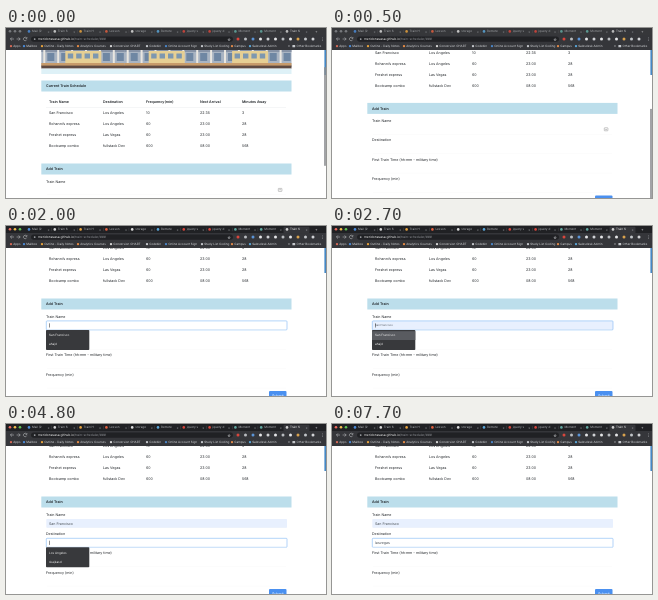
An HTML page that plays this animation: 320x170 px, repeating every 8000 ms.

```html
<!DOCTYPE html>
<html lang="en">
<head>
<meta charset="utf-8">
<title>Train schedule</title>
<style>
  html, body { margin: 0; width: 100%; height: 100%; overflow: hidden; background: #fff; }
  svg { display: block; width: 320px; height: 170px; }
  text { font-family: Inter, "Open Sans", sans-serif; text-rendering: geometricPrecision; white-space: pre; }
</style>
</head>
<body>
<svg id="stage" viewBox="0 0 320 170"></svg>
<script>
const NS = 'http://www.w3.org/2000/svg';
const LOOP = 8000, SCROLL_END = 63;
const stage = document.getElementById('stage');

function add(parent, tag, attrs = {}) {
  const el = document.createElementNS(NS, tag);
  for (const k in attrs) el.setAttribute(k, attrs[k]);
  return parent.appendChild(el);
}
const group = parent => add(parent, 'g');
const rect = (parent, x, y, width, height, fill, extra) =>
  add(parent, 'rect', { x, y, width, height, fill, ...extra });
const dot = (parent, cx, cy, r, fill) => add(parent, 'circle', { cx, cy, r, fill });

// y is the middle of the line
function label(parent, x, y, str, { size = 3.6, fill = '#212529', weight = 400, anchor = 'start' } = {}) {
  const el = add(parent, 'text', {
    x, y: y + size * 0.36, fill, 'font-size': size, 'font-weight': weight, 'text-anchor': anchor
  });
  el.textContent = str;
  return el;
}
const show = (el, on) => el.setAttribute('visibility', on ? 'visible' : 'hidden');

// ---- page ----
rect(stage, 0, 0, 320, 170, '#fff');
const page = group(stage);

function banner() {
  rect(page, 35.3, 10, 250.2, 29, '#a9b4c2');
  for (let i = 0; i < 3; i++) {
    const x = 35.3 + i * 83.4;
    rect(page, x, 20, 83.4, 4, '#8793a6');
    for (let k = 0; k < 6; k++) {
      const px = x + 2 + k * 13.9;
      rect(page, px, 22, 2, 15, '#e9e6e0');
      rect(page, px + 4, 25, 7, 8, '#6f87a3');
    }
    rect(page, x + 24, 23, 36, 13, '#e6cf94');
    for (let k = 0; k < 4; k++) rect(page, x + 26.5 + k * 8.4, 25.5, 5.4, 5, '#7d97b0');
    rect(page, x, 35, 83.4, 3, '#c79b6b');
  }
  rect(page, 35.3, 37.6, 250.2, 3, '#5e4a42');
  rect(page, 35.3, 40.6, 250.2, 5.4, '#def1f7');
}

function heading(y, str) {
  rect(page, 35.3, y - 5.5, 250.2, 11, '#bcdeeb');
  label(page, 40, y, str, { weight: 600 });
}

banner();
heading(58, 'Current Train Schedule');

const columns = [43, 97, 140, 194, 236];
[
  ['Train Name', 'Destination', 'Frequency(min)', 'Next Arrival', 'Minutes Away'],
  ['San Francisco', 'Los Angeles', '10', '22:35', '3'],
  ['Rohanni’s express', 'Los Angeles', '60', '23:00', '28'],
  ['Freshet express', 'Las Vegas', '60', '23:00', '28'],
  ['Bootcamp combo', 'fullstack Dev', '600', '08:00', '568']
].forEach((row, r) => row.forEach((cell, c) =>
  label(page, columns[c], 74 + r * 11, cell, { weight: r ? 400 : 600 })));
rect(page, 40, 79.3, 240, 0.4, '#e6e8ea');

heading(141, 'Add Train');
const fields = ['Train Name', 'Destination', 'First Train Time (hh:mm - military time)', 'Frequency (min)']
  .map((name, i) => {
    const y = 153.4 + i * 19.4;
    label(page, 40, y, name);
    const box = rect(page, 40.3, y + 4.5, 240.7, 9, '#fff', { rx: 0.8, 'stroke-width': 0.6 });
    rect(page, 41, y + 13.3, 239, 0.3, '#f4f4f4');
    return {
      box,
      text: label(page, 43, y + 9, '', { fill: '#495057' }),
      hint: label(page, 43, y + 9, '', { size: 2.7, fill: '#555b66' }),
      caret: rect(page, 43, y + 6.9, 0.5, 4.2, '#222', { visibility: 'hidden' })
    };
  });
const [train, dest] = fields;

const icon = group(page);
rect(icon, 272.3, 160.4, 3.6, 3, '#fff', { stroke: '#8c8c8c', 'stroke-width': 0.5, rx: 0.4 });
rect(icon, 273.2, 161.6, 1.8, 0.5, '#8c8c8c');

rect(page, 263, 228, 17.5, 11, '#4a90f0', { rx: 1 });
label(page, 271.8, 232.6, 'Submit', { fill: '#fff', anchor: 'middle' });

function dropdown(y, items) {
  const g = group(page);
  rect(g, 40, y, 43.3, 20, '#38393c', { rx: 0.8 });
  const hover = rect(g, 40, y + 1.2, 43.3, 8.8, '#595b60');
  items.forEach((s, i) => label(g, 43, y + 5.4 + i * 8.8, s, { size: 3.05, fill: '#f0f0f0' }));
  return { g, hover };
}
const trainMenu = dropdown(167, ['San Francisco', 'ahajd']);
const destMenu = dropdown(186.3, ['Los Angeles', 'skajkasd']);

// ---- browser frame ----
rect(stage, 318.4, 22, 1.6, 25, '#4488c6');
const thumb = rect(stage, 318.2, 39, 1.6, 99, '#8b8d90', { rx: 0.8 });
const strip = rect(stage, 0, 0, 320, 8, '#202124');
rect(stage, 0, 7, 320, 15, '#35363a');
const lights = ['#ed6a5e', '#f4bf4f', '#61c554'].map((c, i) => ({ c, el: dot(stage, 4 + i * 5, 3.3, 1.3, c) }));
const tabNames = ['Mail (2', 'Train S', 'Train H', 'Lesson', 'storage', 'Remote', 'jquery s', 'jquery d', 'Moment', 'Moment', 'Train S'];
const tabDots = ['#4b8bd8', '#d8d8d8', '#e8a33d', '#e2603f', '#dddddd', '#5aa6d8', '#d8463c', '#d8463c', '#62a8a0', '#62a8a0', '#cfcfcf'];
rect(stage, 277.5, 0.8, 26, 7, '#35363a', { rx: 1 });
const tabs = group(stage);
tabNames.forEach((name, i) => {
  const x = 23 + i * 25.8;
  dot(tabs, x, 3.4, 1.3, tabDots[i]);
  label(tabs, x + 3, 3.4, name, { size: 3, fill: i === 10 ? '#f1f1f1' : '#b4b7bb' });
  label(tabs, x + 18.5, 3.4, '×', { size: 3.2, fill: '#aaadb2' });
  if (i < 9) rect(tabs, x + 22.4, 1.8, 0.3, 3.4, '#5a5c60');
});
label(tabs, 309, 3.4, '+', { size: 4, fill: '#c8cacd' });

add(stage, 'path', {
  d: 'M8 11H4.4M6 9.4L4.4 11L6 12.6M10.6 11H14.2M12.6 9.4L14.2 11L12.6 12.6M20.5 10A1.7 1.7 0 1 0 20.7 11.6M20.9 9V10.4H19.5',
  fill: 'none', stroke: '#c8cacd', 'stroke-width': 0.5
});
rect(stage, 25, 8.4, 202, 5.4, '#202124', { rx: 2.7 });
dot(stage, 28.7, 11.1, 0.9, '#a0a3a8');
const url = label(stage, 32, 11.1, 'meridonavasa.github.io', { size: 3.25, fill: '#f1f1f1' });
add(url, 'tspan', { fill: '#92959a' }).textContent = '/train-scheduler/###';
label(stage, 221, 11.1, '☆', { size: 4, fill: '#c8cacd' });
['#d8463c', '#b9bcc0', '#5b94d6', '#e4e5e7', '#d0d2d5', '#e4e5e7', '#b9bcc0', '#e4e5e7', '#d9a24d', '#c1c4c8', '#d0d2d5']
  .forEach((c, i) => dot(stage, 232 + i * 7.5, 11.1, 1.5, c));
[0, 1, 2].forEach(i => dot(stage, 316.5, 9.8 + i * 1.3, 0.35, '#c8cacd'));

[
  [5, 'Apps', '#d56a58'], [18, 'Mailbox', '#4b8bd8'], [36, 'Outline - Daily Notes', '#e8a33d'],
  [72, 'Analytics Courses', '#e58b45'], [105, 'Conversion CHART', '#d8d8d8'],
  [141, 'Codebin', '#c5c8cc'], [160, 'Online Account Sign', '#4b86c8'],
  [196, 'Study List Coding', '#c5c8cc'], [226, 'Campus', '#e08a4a'],
  [244, 'Salesdesk Admin', '#5aa6d8']
].forEach(([x, name, c]) => {
  dot(stage, x, 18.1, 1.2, c);
  label(stage, x + 2.2, 18.1, name, { size: 3, fill: '#d6d8db' });
});
label(stage, 282, 18, '»', { size: 3.4, fill: '#d6d8db' });
rect(stage, 286.4, 17, 2.8, 2.2, '#c5c8cc', { rx: 0.3 });
label(stage, 290.6, 18.1, 'Other Bookmarks', { size: 3, fill: '#d6d8db' });

// ---- timeline ----
const within = (t, a, b) => t >= a && t < b;
const stepAt = (t, steps) => steps.reduce((v, [at, next]) => t >= at ? next : v, '');
const lit = (t, spans) => spans.some(([a, b]) => within(t, a, b));
const typing = [[5800, 'l'], [5900, 'la'], [6800, 'las'], [6900, 'lasve'], [7000, 'lasvega'], [7200, 'lasvegas']];
const stripTone = [[0, '#36373a'], [1200, '#5e6063'], [1300, '#424347'], [1400, '#202124']];
const caretOn = {
  train: [[1900, 2400], [2700, 3400]],
  dest: [[3400, 4000], [4300, 5300], [5800, 6500], [6800, 7700]]
};

function scrollAt(t) {
  const n = Math.floor(t / 100);
  return n >= 9 ? SCROLL_END : SCROLL_END * (1 - 0.52 ** n);
}

function paintField(f, focus, filled, value, hint, caret) {
  f.box.setAttribute('fill', filled ? '#e8f0fe' : '#fff');
  f.box.setAttribute('stroke', focus ? '#80b8f5' : 'none');
  if (f.text.textContent !== value) f.text.textContent = value;
  f.hint.textContent = hint;
  show(f.caret, caret);
  f.caret.setAttribute('x', 43 + (value ? f.text.getComputedTextLength() + 0.2 : 0));
}

function render(t) {
  const scroll = scrollAt(t);
  page.setAttribute('transform', `translate(0 ${-scroll})`);
  thumb.setAttribute('y', 39 + scroll * 0.69);
  show(thumb, t < 900);

  // the window gains focus
  const active = t >= 1300;
  strip.setAttribute('fill', stepAt(t, stripTone));
  tabs.setAttribute('opacity', active ? 1 : 0.85);
  lights.forEach(l => l.el.setAttribute('fill', active ? l.c : '#77797d'));

  const pickTrain = within(t, 2700, 2800), pickDest = within(t, 4300, 4800);
  paintField(train, within(t, 1900, 3400), t >= 2700, t >= 2800 ? 'San Francisco' : '',
    pickTrain ? 'San Francisco' : '', lit(t, caretOn.train));
  paintField(dest, t >= 3400, pickDest, stepAt(t, typing),
    pickDest ? 'Los Angeles' : '', lit(t, caretOn.dest));

  show(icon, t < 1900);
  show(trainMenu.g, within(t, 2000, 2800));
  trainMenu.hover.setAttribute('opacity', pickTrain ? 1 : 0);
  show(destMenu.g, within(t, 3500, 5800));
  destMenu.hover.setAttribute('opacity', pickDest ? 1 : 0);
}

const start = performance.now();
function frame() {
  render((performance.now() - start) % LOOP);
  requestAnimationFrame(frame);
}
frame();
</script>
</body>
</html>
```
